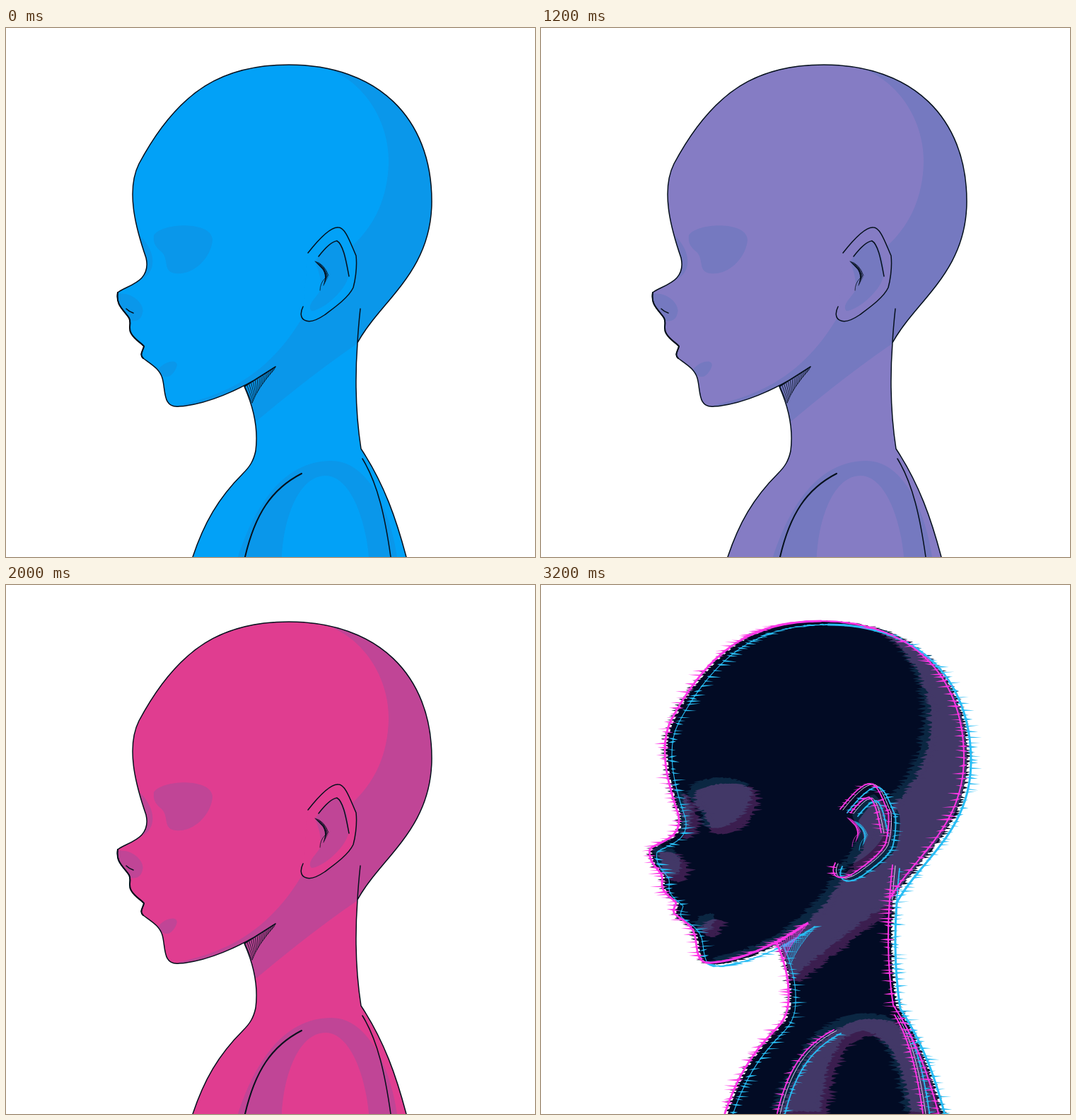
Animation of 748 by 748 pixels, one loop 3.6 s. Source, as an HTML page:

```html
<!DOCTYPE html>
<html lang="en">
<head>
<meta charset="utf-8">
<title>Colour head</title>
<style>
  html, body { margin: 0; width: 100%; height: 100%; overflow: hidden; background: #fff; }
  svg { display: block; width: 100vw; height: 100vh; fill: none; stroke-linecap: round; stroke-linejoin: round; }
  .base { fill: var(--base); }
  .shade { fill: color-mix(in srgb, var(--base) 82%, rgb(46 105 175)); }
  .ink { stroke: #05101c; }
  .blend { mix-blend-mode: screen; isolation: isolate; }
</style>
</head>
<body>
<svg id="stage" viewBox="0 0 748 748"></svg>
<script>
const STEP = 400;
const SKINS = ['#02a1f7', '#11b0d1', '#21bfac', '#857cc4', '#e83adb', '#e03d90', '#d44144', '#e0d540'];
const DARK = '#020b24', PINK = '#ff35e6', CYAN = '#28bdf4';

// Contours
const front = `M400,52 C310,52 245,85 188,192 C168,232 186,290 198,325 C206,360 170,364 158,374
  C155,392 166,398 174,410 C178,418 172,424 177,432 C183,442 190,444 195,450
  C194,456 188,462 194,467 C206,476 217,482 221,495 C226,512 221,538 245,535
  C280,533 330,514 381,479 L337,507
  C354,545 356,575 353,598 C350,612 345,620 335,630 C300,665 280,700 264,748`;
const rear = `M566,748 C552,695 535,645 502,595 C495,550 493,500 497,445
  C530,385 602,345 602,245 C602,126 524,52 400,52`;
const body = front + rear.replace('M', 'L') + 'Z';

const mouth = 'M158,374 C155,392 166,398 174,410 C178,418 172,424 177,432 C183,442 190,444 195,450 C194,456 188,462 194,467';
const ear = `M427,318 C445,295 460,281 470,282 C480,282 487,304 495,322 C497,340 493,360 491,367
  C484,382 462,397 450,406 C425,423 411,412 420,394`;
const earFold = 'M442,323 C452,310 460,302 468,301 C477,306 481,330 485,351';
const shoulder = 'M418,630 C375,652 352,688 338,748';
const armLine = 'M504,609 C526,645 536,692 544,748';
const napeLine = 'M501,397 Q498,425 497,445';
const nostril = 'M170,397 Q174,401 180,403';

// Shadows run past the contour and are clipped to it
const headShade = `M420,50 L640,50 L640,446 L497,446 Q430,492 354,556 L240,545 L245,533
  C330,515 380,475 420,408 L490,308 C525,275 540,235 541,190 C542,120 490,52 420,52Z`;
const earShade = `M442,323 C452,310 460,302 468,301 C480,308 487,335 484,352
  C478,375 445,400 432,400 C424,392 440,380 445,370 C446,350 440,340 437,330Z`;
const armShade = `M328,748 C350,680 390,612 460,612 C515,612 545,690 553,748
  L513,748 C508,690 485,633 452,633 C415,633 393,690 390,748Z`;
const spots = `M190,294 C215,320 210,345 194,354Z
  M156,376 C180,372 197,392 193,403 C190,420 170,416 162,405Z
  M215,483 C225,469 250,466 239,484 C232,496 222,497 215,483Z`;
const eye = `M209,293 C220,275 292,272 292,300 C290,325 265,350 240,347
  C220,345 232,325 218,315 C211,309 208,304 209,293Z`;
const allShades = headShade + armShade + spots + eye;

// Fine hatching below the jaw
let hatch = 'M348,530 Q355,510 379,483';
for (let t = 0; t < 1; t += 1 / 15) {
  const u = 1 - t;
  const x = u * u * 348 + 2 * u * t * 355 + t * t * 379;
  const y = u * u * 530 + 2 * u * t * 510 + t * t * 483;
  hatch += `M${338 + 43 * t},${507 - 28 * t}L${x},${y}`;
}
// Scribble inside the ear
let scribble = 'M451,354 Q444,361 444,371';
for (let i = 0; i < 8; i++) {
  scribble += `M${437 + i},${330 + i}Q${450 + i},${333 + i * 2} ${456 - i},${350 + i * 2}`;
}

const stage = document.getElementById('stage');
function add(parent, tag, attrs = {}) {
  const el = document.createElementNS('http://www.w3.org/2000/svg', tag);
  for (const k in attrs) el.setAttribute(k, attrs[k]);
  parent.appendChild(el);
  return el;
}
const path = (parent, d, attrs) => add(parent, 'path', { d, ...attrs });
const line = (parent, d, stroke, width) => path(parent, d, { stroke, 'stroke-width': width });

const defs = add(stage, 'defs');
path(add(defs, 'clipPath', { id: 'inside' }), body);

// The ear stands out of the head shadow
function shades(parent, paint, earPaint) {
  path(parent, headShade, paint);
  path(parent, ear + 'Z', earPaint);
  path(parent, earShade + armShade + spots + eye, paint);
}

// Flat coloured head
const plain = add(stage, 'g');
path(plain, body, { class: 'base' });
shades(add(plain, 'g', { 'clip-path': 'url(#inside)' }), { class: 'shade' }, { class: 'base' });
const ink = (width, ...lines) => path(plain, lines.join(''), { class: 'ink', 'stroke-width': width });
ink(1.5, front, rear, ear, earFold, armLine, napeLine, nostril);
ink(2, mouth, shoulder);
ink(.8, hatch, scribble);

// Dark head with split colours and ragged edges
const glitch = add(stage, 'g', { style: 'isolation:isolate' });
let seed = 41;
const rnd = () => (seed = (seed * 16807) % 2147483647) / 2147483647;

// Tapered, nearly horizontal strokes scattered along a path
function streaks(parent, d, fill, gap, left, right, thick) {
  const probe = path(defs, d), len = probe.getTotalLength();
  let out = '';
  for (let s = rnd() * gap; s < len; s += gap * (.5 + rnd())) {
    const { x, y } = probe.getPointAtLength(s);
    const a = x - left * (.25 + .75 * rnd()), b = x + right * (.25 + .75 * rnd());
    const h = thick * (.25 + rnd() * .35), tilt = (rnd() - .5) * 3;
    out += `M${a},${y + tilt}L${x},${y - h}L${b},${y - tilt}L${x},${y + h}Z`;
  }
  probe.remove();
  path(parent, out, { fill });
}

path(glitch, body, { fill: DARK });
streaks(glitch, front + rear, DARK, 5, 12, 10, 3.6);

function ghost(fill, dx, dy, left, right) {
  const clip = add(glitch, 'g', { class: 'blend', 'clip-path': 'url(#inside)' });
  const g = add(clip, 'g', { transform: `translate(${dx} ${dy})` });
  shades(g, { fill }, { fill: '#000' });
  streaks(g, allShades, fill, 5, left, right, 5);
}
ghost('#091d23', 3, -5, 12, 10);
ghost('#391432', 12, 3, 10, 14);

const detail = ear + earFold + shoulder + armLine + napeLine;
line(glitch, detail, '#dcd0f2', 1);

function fringe(color, dx, dy, frontWidth, rearWidth, left, right) {
  const g = add(glitch, 'g', { transform: `translate(${dx} ${dy})` });
  line(g, front, color, frontWidth);
  line(g, rear, color, rearWidth);
  line(g, detail, color, 1.8);
  line(g, hatch + scribble, color, .7);
  streaks(g, front + rear, color, 8, left, right, 2.4);
  streaks(g, detail, color, 8, left * .7, right * .7, 2.2);
}
fringe(CYAN, 6, 4, 1.1, 3, 8, 18);
fringe(PINK, -4, -1, 2.8, 2, 18, 9);

let shown = -1;
function draw(now) {
  const i = Math.floor(now / STEP) % (SKINS.length + 1);
  if (i !== shown) {
    shown = i;
    const flat = i < SKINS.length;
    plain.style.display = flat ? '' : 'none';
    glitch.style.display = flat ? 'none' : '';
    if (flat) plain.style.setProperty('--base', SKINS[i]);
  }
  requestAnimationFrame(draw);
}
draw(0);
</script>
</body>
</html>
```
